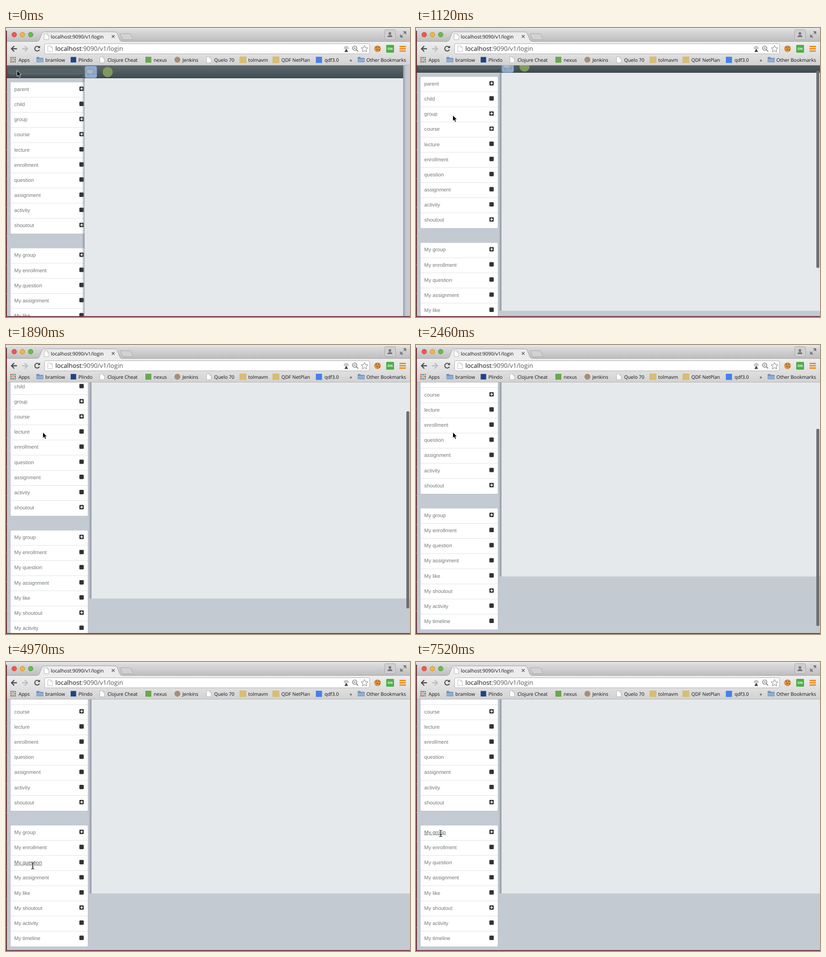
Recreate the animation shown at these times as an HTML page. Size 884x633 px, loop 8000 ms.

```html
<!DOCTYPE html>
<html lang="en">
<head>
<meta charset="utf-8">
<title>Sidebar menu</title>
<style>
  html, body { margin: 0; width: 100%; height: 100%; overflow: hidden; background: #c4cad2; }
  svg { display: block; width: 884px; height: 633px; }
  text { font-family: "Open Sans", "Noto Sans", sans-serif; font-size: 10.5px; fill: #111; text-rendering: geometricPrecision; white-space: pre; }
  .row text { font-family: "Liberation Sans", Arial, sans-serif; font-size: 11.3px; fill: #757779; }
  .row.hover text { text-decoration: underline; fill: #5c5f61; }
</style>
</head>
<body>
<svg viewBox="0 0 884 633">
  <defs>
    <linearGradient id="tabs" x2="0" y2="1"><stop stop-color="#e6e9ea"/><stop offset=".18" stop-color="#dadada"/><stop offset="1" stop-color="#bdbdbd"/></linearGradient>
    <linearGradient id="tools" x2="0" y2="1"><stop stop-color="#eeeeee"/><stop offset="1" stop-color="#d2d2d2"/></linearGradient>
    <linearGradient id="bar" x2="0" y2="1"><stop stop-color="#5d696d"/><stop offset=".5" stop-color="#4f5b5f"/><stop offset="1" stop-color="#3f4b4f"/></linearGradient>
    <linearGradient id="shadeL"><stop stop-color="#65707a" stop-opacity="0"/><stop offset="1" stop-color="#65707a" stop-opacity=".6"/></linearGradient>
    <linearGradient id="shadeR"><stop stop-color="#65707a" stop-opacity=".5"/><stop offset="1" stop-color="#65707a" stop-opacity="0"/></linearGradient>
    <clipPath id="view"><path d="M2 82H884V631H2z"/></clipPath>
    <g id="page"><path d="M.5.5h6.500l3.500 3.500v9.500h-10z" fill="#fff" stroke="#a9a9a9" stroke-width=".8"/><path d="M7 .5V4h3.500" fill="none" stroke="#a9a9a9" stroke-width=".8"/></g>
    <g id="folder"><path d="M0 2q0-1.500 1.500-1.500h4l1.500 2h7q1.500 0 1.500 1.500v7q0 1-1 1h-13.500q-1 0-1-1z" fill="#6d8fb8"/><path d="M.5 4.500h14.500v6.500h-14.500z" fill="#8fafd3"/></g>
  </defs>

  <!-- browser window -->
  <path d="M0 0H884V30H0z" fill="url(#tabs)"/>
  <path d="M0 29.500H884V82H0z" fill="url(#tools)"/>
  <path d="M0 29.500H69M253 29.500H884" stroke="#a4a4a4"/>
  <path d="M0 81.500H884" stroke="#b4b4b4"/>
  <path d="M68 30q4-1 5.500-5l5-13q1.200-3.500 5-3.500h154.500q4 0 5.500 3.500l5 13q1.500 4 5.500 5" fill="#ececec" stroke="#a2a2a2"/>
  <path d="M69 30H253" stroke="#ececec" stroke-width="2"/>
  <path d="M251 12.500h19q2 0 3 2l4.500 9q1 2-1.500 2h-18q-2 0-3-2l-5-9q-1-2 1-2z" fill="#d2d2d2" stroke="#a9a9a9"/>
  <g id="lights" stroke-width=".8"></g>
  <use href="#page" x="83" y="12"/>
  <text x="98" y="22.500" style="font-size:10.7px">localhost:9090/v1/login</text>
  <path d="M231.500 15.500l6 6m0-6l-6 6" stroke="#555" stroke-width="1.300"/>
  <rect x="828.500" y="3.500" width="24" height="22" rx="3" fill="#cfcfcf" stroke="#a8a8a8"/>
  <path d="M834.500 20q0-4 5.500-4.500t5.500 4.500z" fill="#777"/><circle cx="840" cy="12" r="3" fill="#777"/>
  <path d="M870 8h5v5zM863 15v5h5zM870 13l4-4M864 19l4-4" fill="#777" stroke="#777" stroke-width="1.300"/>
  <path d="M24 45.500H12m6-6l-6 6 6 6" fill="none" stroke="#4a4a4a" stroke-width="2.300"/>
  <path d="M35 45.500H47m-6-6l6 6-6 6" fill="none" stroke="#bcbcbc" stroke-width="2.300"/>
  <path d="M72.500 42a5.300 5.300 0 1 0 .6 5.500" fill="none" stroke="#4a4a4a" stroke-width="2.100"/><path d="M74.500 38.500v5.500h-5.500z" fill="#4a4a4a"/>
  <rect x="84.500" y="34.500" width="711" height="22" rx="2.500" fill="#fff" stroke="#b0b0b0"/>
  <use href="#page" x="91" y="38.500"/>
  <text x="108" y="50" style="font-size:13.7px">localhost<tspan fill="#555">:9090/v1/login</tspan></text>
  <path d="M744.500 45l4 7.500h-8z" fill="#444"/><path d="M740 46q-1-6 4.500-6t4.500 6" fill="#ccc" stroke="#aaa"/>
  <circle cx="763" cy="44" r="4.600" fill="#fff" stroke="#666" stroke-width="1.400"/><path d="M761 44h4M766.500 47.500l4 4" stroke="#666" stroke-width="1.600"/>
  <path d="M784.500 38l2.200 5 5.300.5-4 3.600 1.200 5.400-4.700-2.900-4.700 2.900 1.200-5.400-4-3.600 5.300-.5z" fill="#fff" stroke="#777"/>
  <circle cx="813" cy="45.500" r="7.300" fill="#d9923f"/><path d="M809 42h2m4 0h2m-6 5h2m3 1h2" stroke="#7b431b" stroke-width="2"/>
  <rect x="832" y="37" width="17" height="17" rx="1.500" fill="#4caf45"/>
  <text x="840.500" y="48.300" text-anchor="middle" style="font-size:7px;fill:#fff;font-weight:700">ON</text>
  <path d="M861 40.500h14m-14 5h14m-14 5h14" stroke="#ef8b1c" stroke-width="3"/>
  <g id="bookmarks"></g>

  <!-- web page -->
  <g clip-path="url(#view)">
    <path d="M0 82H884V633H0z" fill="#c4cad2"/>
    <g id="scroll">
      <path d="M2 82H240V110H2z" fill="url(#bar)"/>
      <path d="M2 109.500H240" stroke="#2c373b"/>
      <path d="M2 110.500H240" stroke="#dfe3e7"/>
      <rect id="search" x="2.500" y="86.500" height="17" rx="8.500" fill="#566266" stroke="#434f53"/>
      <g id="lists"></g>
      <g id="panel">
        <path d="M-6 82h6v549.500h-6z" fill="url(#shadeL)"/>
        <path d="M697 82h6v549.500h-6z" fill="url(#shadeR)"/>
        <path d="M0 82h697v549.500H0z" fill="#e5e9ec"/>
        <path d="M0 82h697v28H0z" fill="url(#bar)"/>
        <path d="M0 109.500h697" stroke="#2c373b"/>
        <rect x="1" y="83.500" width="25.500" height="25.500" rx="3" fill="#8facd0" stroke="#839fc1"/>
        <g fill="#a9b9c9" stroke="#7189a3"><path d="M19 100l3 3-1-4q3-2 .5-5-2-2-6-1.500z"/><path d="M12 90c-11 0-10 10-3 10l-2 3.500 5-3c10 0 10-10.500 0-10.500z"/></g>
        <circle cx="50.500" cy="96.500" r="11" fill="#7f9a5c"/>
      </g>
    </g>
    <rect id="thumb" x="876" width="6.500" height="432" rx="3.200" fill="#6c7072"/>
  </g>
  <path d="M1 6V633" stroke="#682c2f" stroke-width="2"/>
  <path d="M1 140V633" stroke="#9b8580" stroke-width="1" stroke-dasharray="2 23 1 37"/>
  <path d="M0 632H884" stroke="#763744" stroke-width="2"/>
  <path id="arrow" d="M0 0v13l3-2.700 2.200 5 2.300-1-2.100-4.800h4z" fill="#000" stroke="#fff" stroke-width=".9"/>
  <path id="beam" d="M-3.500-7q3 0 3.500 1.500.5-1.500 3.500-1.500M0-5.500v11M-3.500 7q3 0 3.500-1.500.5 1.500 3.500 1.500M-2 2.500h4" fill="none" stroke="#111" stroke-width="1.200"/>
</svg>
<script>
const $ = id => document.getElementById(id);
const rect = (x, y, w, h, fill, r = 0) => `<rect x="${x}" y="${y}" width="${w}" height="${h}" rx="${r}" fill="${fill}"/>`;
const dot = (x, y, r, fill, stroke = 'none') => `<circle cx="${x}" cy="${y}" r="${r}" fill="${fill}" stroke="${stroke}"/>`;
const label = (x, y, s) => `<text x="${x}" y="${y}">${s}</text>`;
const use = (id, x, y) => `<use href="#${id}" x="${x}" y="${y}"/>`;

$('lights').innerHTML = dot(18, 14.5, 5.2, '#f0574f', '#b63a35')
  + dot(36, 14.5, 5.2, '#f3b63f', '#b98427') + dot(54, 14.5, 5.2, '#66bd4a', '#458c30');

const gridColors = ['#e2483d', '#f0a32f', '#4aa552', '#3f7fdb'];
let grid = '';
for (let i = 0; i < 9; i++) grid += rect(9.5 + i % 3 * 4.5, 63.5 + (i / 3 | 0) * 4.5, 3, 3, gridColors[(i * 3 + (i / 3 | 0)) % 4]);
$('bookmarks').innerHTML = grid
  + use('folder', 66.5, 63) + use('folder', 769.5, 63) + use('page', 205, 62.5) + use('page', 438.5, 62.5)
  + rect(141.5, 63.5, 12, 12, '#1d4484') + rect(305, 63, 13, 13, '#68a84d')
  + dot(375, 69.5, 6.5, '#a88d78') + rect(511, 62.5, 15, 14, '#d8bd72')
  + rect(583, 62.5, 15, 14, '#d8bd72') + rect(678, 63, 13.5, 13.5, '#4680ee')
  + [[27.5, 'Apps'], [86, 'bramlow'], [158.5, 'Plindo'], [222, 'Clojure Cheat'], [323, 'nexus'],
     [386, 'Jenkins'], [455.5, 'Quelo 70'], [530, 'tolmavm'], [602.5, 'QDF NetPlan'], [697, 'qdf3.0'],
     [752, '»'], [788.5, 'Other Bookmarks']].map(([x, s]) => label(x, 73.5, s)).join('');

const PITCH = 33.15;
// A trailing "+" marks an expandable entry.
function list(top, names) {
  const rows = names.map((name, i) => {
    const y = top + i * PITCH, text = name.replace('+', '');
    return `<g class="row" data-name="${text}">` + label(18, y + 18.9, text)
      + rect(160.5, y + 9.2, 9.7, 9.7, '#323334', 1.8)
      + (name.endsWith('+') ? `<path d="M162.500 ${y + 14}h6m-3-3v6" stroke="#fff" stroke-width="1.700"/>` : '')
      + (i ? `<path d="M10 ${y - .5}H179" stroke="#dce2e5"/>` : '') + '</g>';
  });
  const height = names.length * PITCH;
  return rect(9.5, top, 170, height + .8, '#b3bac1', 2) + rect(10, top, 169, height, '#fff', 2)
    + `<g class="trail">${rect(162, top, 17, height, '#e5e9ec')}</g>` + rows.join('');
}
$('lists').innerHTML =
  list(119, ['parent+', 'child', 'group+', 'course+', 'lecture', 'enrollment', 'question', 'assignment', 'activity', 'shoutout+'])
  + list(482.5, ['My group+', 'My enrollment', 'My question', 'My assignment', 'My like', 'My shoutout+', 'My activity', 'My timeline']);
const rows = document.querySelectorAll('.row'), trails = document.querySelectorAll('.trail');

// Stepped tracks: [time, value...]
const panelTrack = [[0, 172], [170, 162], [320, 170], [470, 179], [670, 185], [820, 187]];
const scrollTrack = [[0, 0], [1120, 12], [1330, 36.5], [1620, 58], [1890, 76.2], [2190, 104], [2460, 124.5]];
const pointerTrack = [
  [0, 24, 93], [170, 29, 102], [320, 43, 128], [470, 60, 157], [670, 75, 181], [820, 80.5, 191],
  [3000, 75, 320, 'shoutout'], [3230, 69, 467, 'shoutout'], [3470, 63, 473, 'My assignment'],
  [3770, 59, 460, 'My assignment'], [3920, 57, 440, 'My question'], [4070, 56, 410, 'My enrollment'],
  [4220, 55, 388], [4370, 55, 372, 'My group'],
  [4670, 55, 381, 'My group'], [4820, 56, 413, 'My enrollment'], [4970, 58.5, 446.5, 'My question'],
  [5120, 59, 474, 'My assignment'], [5270, 57, 492], [5420, 53, 507, 'My like'],
  [5720, 53, 509, 'My like'], [5870, 55, 494], [6020, 57, 481, 'My assignment'],
  [6320, 57, 479, 'My assignment'], [6470, 55, 492], [6620, 53, 503, 'My like'],
  [6770, 57, 473, 'My assignment'], [6920, 57, 418, 'My enrollment'], [7070, 56, 369, 'My group'],
  [7370, 55, 372, 'My group'], [7520, 54, 375.5, 'My group']
];
const at = (track, t) => track.findLast(key => key[0] <= t);
const show = (el, on) => el.setAttribute('visibility', on ? 'visible' : 'hidden');
const move = (el, x, y) => el.setAttribute('transform', `translate(${x} ${y})`);

function frame() {
  const t = performance.now() % 8000;
  const [, panelX] = at(panelTrack, t), [, scroll] = at(scrollTrack, t), [, x, y, hover] = at(pointerTrack, t);
  move($('panel'), panelX, 0);
  $('search').setAttribute('width', panelX - 4);
  move($('scroll'), 0, -scroll);
  $('thumb').setAttribute('y', 84 + scroll * .8);
  show($('thumb'), t >= 1120 && t < 3000);
  trails.forEach(el => show(el, t >= 320 && t < 1120));
  rows.forEach(row => row.classList.toggle('hover', row.dataset.name === hover));
  const typing = t >= 3000;
  show($('arrow'), !typing);
  show($('beam'), typing);
  move($(typing ? 'beam' : 'arrow'), x, y);
  requestAnimationFrame(frame);
}
frame();
</script>
</body>
</html>
```
